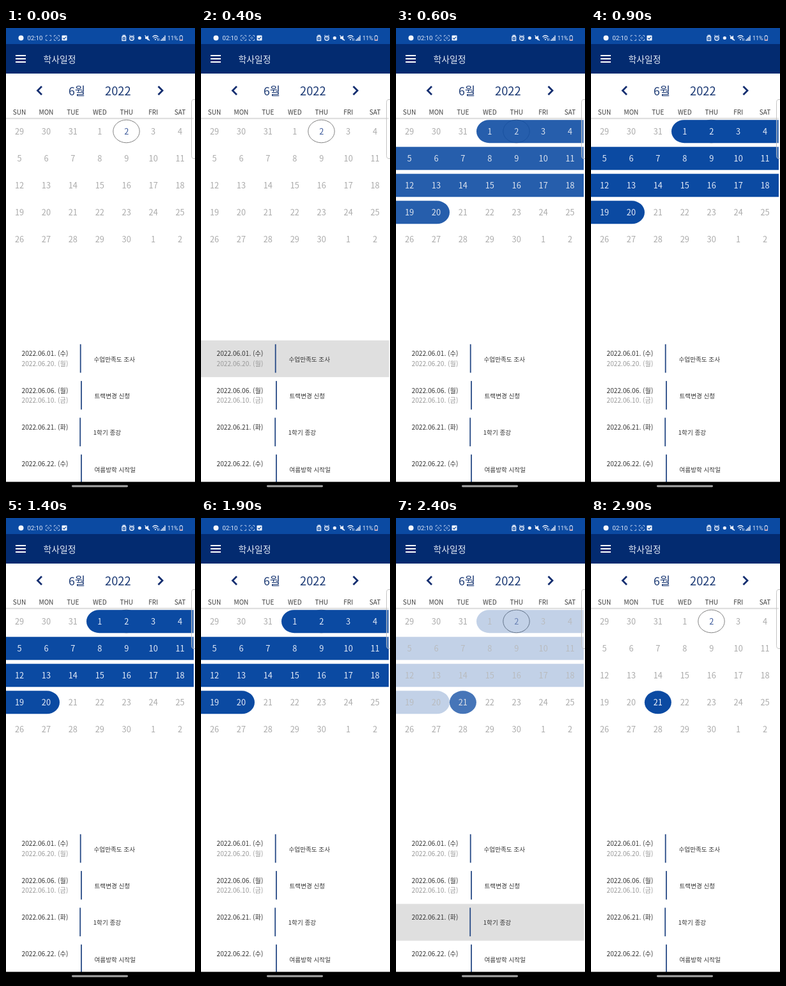
These frames come from a looping animation (296x720 px, 3.3 s). An HTML page:

```html
<!DOCTYPE html>
<html lang="ko">
<head>
<meta charset="utf-8">
<title>학사일정</title>
<style>
  html, body { margin: 0; width: 100%; height: 100%; overflow: hidden; background: #fff; }
  svg { display: block; width: 296px; height: 720px; }
  text { font-family: "Noto Sans CJK KR", "Noto Sans CJK", "Noto Sans CJK JP", "Noto Sans", sans-serif; }
  .status { font-family: Roboto, sans-serif; }
</style>
</head>
<body>
<svg id="stage" viewBox="0 0 296 720">
  <defs>
    <linearGradient id="shade" x2="0" y2="1">
      <stop stop-color="#cfcfcf"/><stop offset="1" stop-color="#fff"/>
    </linearGradient>
  </defs>
  <rect width="296" height="720" fill="#fff"/>
  <rect width="296" height="25.5" fill="#0b4aa2"/>
  <rect y="25" width="296" height="46" fill="#032b70"/>
  <g fill="none" stroke="#e8eefa" stroke-width="1">
    <circle cx="23.5" cy="15.5" r="4" fill="#f4f7ff" stroke="none"/>
    <g stroke="#a9c0e6" stroke-width=".9">
      <path id="scanFrame" d="M62.5 14v-2.500h2.500M68 11.500h2.500v2.500M70.500 17v2.500h-2.500M65 19.500h-2.500v-2.500"/>
      <use href="#scanFrame" x="13"/>
      <circle id="scanDot" cx="66.500" cy="15.500" r="1.500"/>
      <circle cx="79.500" cy="15.500" r="1.500"/>
    </g>
    <rect x="87.500" y="11.500" width="8" height="8" rx="1" fill="#f4f7ff" stroke="none"/>
    <path d="M89.300 15.500l1.700 1.800 2.900-3.500" stroke="#0b4aa2" stroke-width="1.200"/>
    <path d="M182 13.500h5.500v6h-5.500zM183.300 13.500v-2h3v2M184.700 15.500v2" stroke-width="1.400"/>
    <circle cx="197" cy="16" r="3.200" stroke-width="1.400"/>
    <path d="M197 14v2h1.500M193 12.500l1.800-1.500M201 12.500l-1.800-1.500"/>
    <circle cx="209.300" cy="15.500" r="2.600" fill="#e8eefa" stroke="none"/>
    <path d="M218 14h2l3-2.500v8l-3-2.500h-2z" fill="#e8eefa" stroke="none"/>
    <path d="M217.500 11.500l7.500 8" stroke-width="1.200"/>
    <path d="M229.500 14q4.500-4.500 9 0M231.200 16q2.800-2.800 5.600 0" stroke-width="1.200"/>
    <circle cx="234" cy="18" r="1.100" fill="#e8eefa" stroke="none"/>
    <path d="M237.500 16v4M239.500 16v4" stroke-width=".8"/>
    <path d="M243 20v-2M245 20v-4M247 20v-6M249 20v-8.500" stroke-width="1.400"/>
    <path d="M272 12.500h4.500v7h-4.500zM273.300 11.500h2" stroke="#b9cbea"/>
    <path d="M272.500 18.500h3.500" stroke="#e08a8a" stroke-width="1.500"/>
  </g>
  <path d="M15 43h16M15 48h16M15 53h16" stroke="#fff" stroke-width="1.800"/>
  <path d="M56 91l-6.500 6.500 6.500 6.500M238.500 91l6.500 6.500-6.500 6.500" fill="none" stroke="#122e70" stroke-width="2.800"/>
  <rect y="140" width="294" height="3" fill="url(#shade)"/>
</svg>
<script>
const LOOP = 3300, BLUE = "#0b4aa2", NAVY = "#1b3974";
const stage = document.getElementById("stage");

function add(tag, attrs, parent = stage) {
  const el = document.createElementNS("http://www.w3.org/2000/svg", tag);
  for (const key in attrs) el.setAttribute(key, attrs[key]);
  parent.append(el);
  return el;
}

// y is the optical middle of the line
function label(str, x, y, size, fill, anchor = "start", parent = stage) {
  const el = add("text", { x, y: y + size * 0.37, "font-size": size, fill, "text-anchor": anchor }, parent);
  el.textContent = str;
  return el;
}

const colX = i => 21 + i * 41.93;
const rowY = i => 161.2 + i * 42.05;
const day = (str, i, fill, parent) =>
  label(str, colX(i % 7), rowY(Math.floor(i / 7)), 12.8, fill, "middle", parent);

label("02:10", 33.5, 15.7, 9.6, "#e8eefa").classList.add("status");
label("11%", 253, 15.7, 9, "#e8eefa").classList.add("status");
label("학사일정", 58.5, 48.5, 13.9, "#e6ecf7");
label("6월", 111, 98, 17.7, NAVY, "middle");
label("2022", 175.3, 98, 18.3, NAVY, "middle");
["SUN", "MON", "TUE", "WED", "THU", "FRI", "SAT"].forEach((weekday, i) =>
  label(weekday, colX(i), 131.5, 10.1, "#3c3c3c", "middle"));

// Month grid: starts on 29 May, ends on 2 July
const dates = Array.from({ length: 35 }, (_, i) => i < 3 ? 29 + i : i < 33 ? i - 2 : i - 32);
dates.forEach((d, i) => day(d, i, i === 4 ? "#3f5c9c" : "#ababab"));
add("ellipse", { cx: 188.5, cy: 161, rx: 20.7, ry: 17.8, fill: "none", stroke: "#747474", "stroke-width": 0.9 });

const rangeMark = add("g", {});
const bandTop = i => rowY(i) - 18;
add("path", {
  fill: BLUE,
  d: `M294 ${bandTop(0)}H146a20 18 0 0 0 0 36H294z
      M0 ${bandTop(1)}H294v36H0z M0 ${bandTop(2)}H294v36H0z
      M0 ${bandTop(3)}H64a20 18 0 0 1 0 36H0z`
}, rangeMark);
for (let i = 3; i < 23; i++) day(dates[i], i, "#e4ecf8", rangeMark);

const dayMark = add("g", {});
add("ellipse", { cx: colX(2), cy: rowY(3), rx: 21, ry: 18, fill: BLUE }, dayMark);
day(21, 23, "#f0f4fb", dayMark);

add("path", { d: "M297 111.500h-3q-3.500 0-3.500 5v82q0 5 3.500 5h3", fill: "#fff", "fill-opacity": 0.25, stroke: "#bdbdbd", "stroke-width": 0.9 });

const schedule = [
  ["2022.06.01. (수)", "2022.06.20. (월)", "수업만족도 조사", 116.7, 137.5],
  ["2022.06.06. (월)", "2022.06.10. (금)", "트랙변경 신청", 118, 138.5],
  ["2022.06.21. (화)", "", "1학기 종강", 116.2, 136.8],
  ["2022.06.22. (수)", "", "여름방학 시작일", 118, 138.5]
];
const presses = schedule.map(([from, to, title, barX, titleX], i) => {
  const y = 486.8 + i * 57.3;
  const press = add("rect", { y, width: 294.5, height: 57.3, fill: "#dfdfdf", opacity: 0 });
  label(from, 24.5, y + 20.8, 10.2, "#333");
  label(to, 24.5, y + 36, 10.2, "#999");
  add("rect", { x: barX - 0.9, y: y + 6, width: 1.8, height: 44.5, fill: "#274a86" });
  label(title, titleX, y + 29.3, 9.6, "#333");
  return press;
});

add("rect", { y: 707.3, width: 296, height: 13, fill: "#000" });
add("rect", { x: 103, y: 712.6, width: 88, height: 2.8, rx: 1.4, fill: "#a8a8a8" });

// steps: [time in ms, opacity], each held until the next
function play(el, steps) {
  const frames = steps.map(([t, opacity]) => ({ offset: t / LOOP, opacity, easing: "steps(1, end)" }));
  frames.push({ offset: 1, opacity: steps[steps.length - 1][1] });
  el.animate(frames, { duration: LOOP, iterations: Infinity });
}

play(document.getElementById("scanDot"), [[0, 0], [400, 1], [900, 0], [1400, 1], [1900, 0], [2400, 1], [2900, 0]]);
play(presses[0], [[0, 0], [300, 1], [600, 0]]);
play(presses[2], [[0, 0], [2200, 1], [2500, 0]]);
play(rangeMark, [[0, 0], [500, 0.58], [600, 0.89], [700, 0.97], [800, 1], [2300, 0.62], [2400, 0.25], [2500, 0.06], [2600, 0]]);
play(dayMark, [[0, 0], [2300, 0.38], [2400, 0.76], [2500, 0.94], [2600, 1]]);
</script>
</body>
</html>
```
